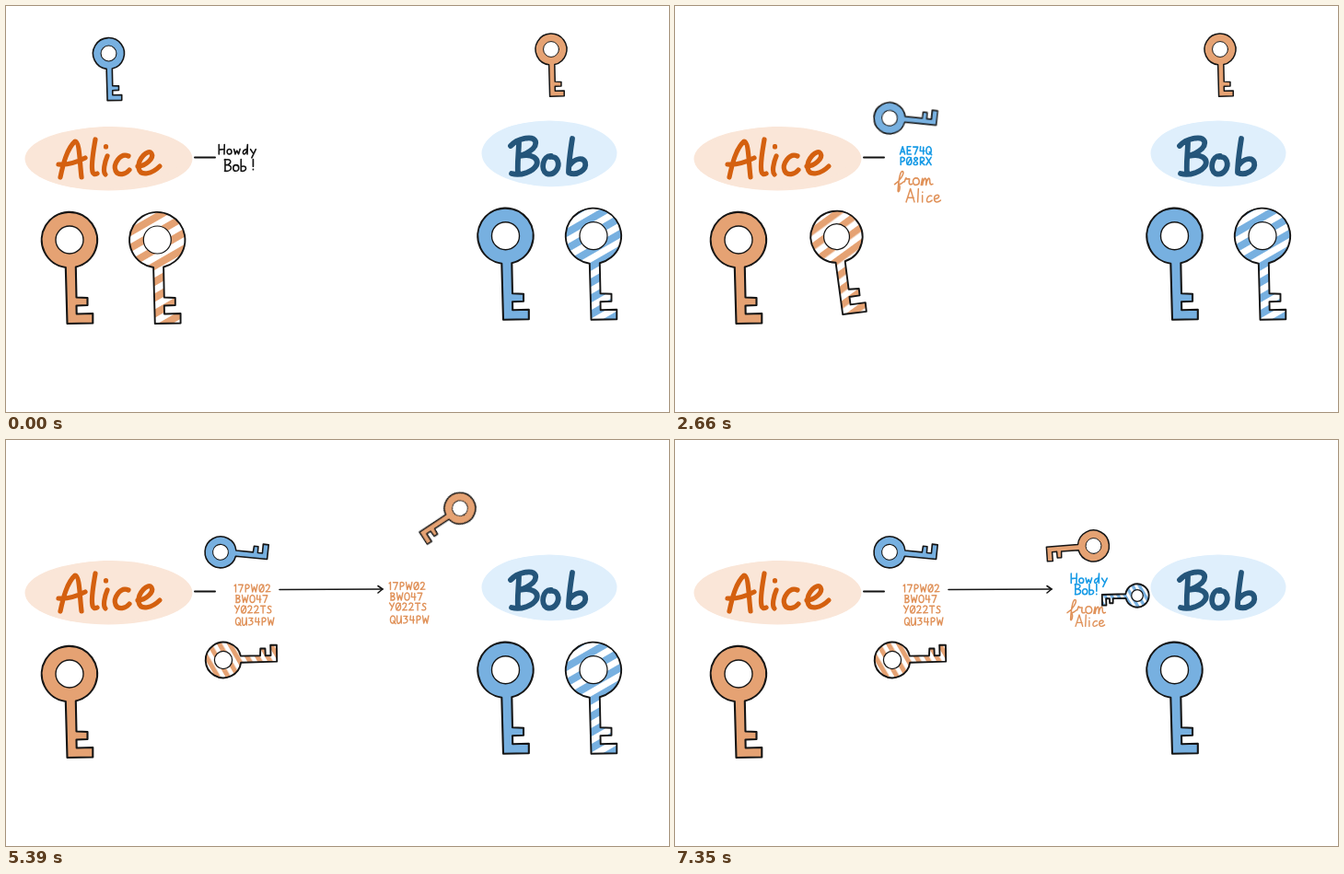
Animation of 720x441 px, one loop 8260 ms. Source, as an HTML page:

```html
<!DOCTYPE html>
<html lang="en">
<head>
<meta charset="utf-8">
<title>Two key pairs</title>
<style>
  html, body { margin: 0; width: 100%; height: 100%; overflow: hidden; background: #fff; }
  svg { display: block; width: 100vw; height: 100vh; }
  path { stroke-linecap: round; stroke-linejoin: round; vector-effect: non-scaling-stroke; }
  .ink { fill: none; }
</style>
</head>
<body>
<svg id="stage" viewBox="0 0 720 441" role="img" aria-label="Alice sends Bob a signed and encrypted message">
  <defs>
    <pattern id="orangeStripes" width="40" height="15" patternUnits="userSpaceOnUse" patternTransform="rotate(-30) translate(0 4)">
      <rect width="40" height="15" fill="#fff"/><rect width="40" height="8" fill="#e5a273"/>
    </pattern>
    <pattern id="blueStripes" width="40" height="15" patternUnits="userSpaceOnUse" patternTransform="rotate(-30) translate(0 8.5)">
      <rect width="40" height="15" fill="#fff"/><rect width="40" height="8" fill="#77b0e0"/>
    </pattern>
    <filter id="soft"><feGaussianBlur stdDeviation="0.7"/></filter>
  </defs>
  <g filter="url(#soft)">
    <g fill="#fae6d8">
      <ellipse cx="111.500" cy="166" rx="91" ry="34.5"/>
      <ellipse cx="108" cy="165" rx="84" ry="34" transform="rotate(-2 108 165)"/>
    </g>
    <g fill="#dfeffc">
      <ellipse cx="590" cy="160" rx="73.5" ry="35.5"/>
      <ellipse cx="588" cy="161" rx="70" ry="35" transform="rotate(3 588 161)"/>
    </g>
  </g>
  <g class="ink" stroke="#d4600f" stroke-width="5.200" aria-label="Alice">
    <path d="M59 186C62 172 66 155 75 147C80 147 80 170 82 186M57 172C66 173 76 170 86 165"/>
    <path d="M97 145C95 157 92 172 94 180Q95 184 99 182"/>
    <path d="M110 163C107 170 105 180 108 183M108.500 152.500V153"/>
    <path d="M133 163C124 159 116 172 119 179C122 185 130 183 134 178"/>
    <path d="M143 174C152 174 161 165 158 160C154 155 143 166 144 176C146 186 159 182 167 174"/>
  </g>
  <g class="ink" stroke="#24557a" stroke-width="5.800" aria-label="Bob">
    <path d="M557 147C557 158 555 170 556 182M548 152C555 144 572 140 575 147C577 155 566 160 558 163C572 160 579 166 576 173C572 180 559 185 549 182"/>
    <path d="M592 163C583 162 580 178 587 182C595 185 602 176 599 168Q597 163 591 164"/>
    <path d="M615 144C613 157 611 170 611 181C620 185 631 178 629 170C627 164 618 165 612 173"/>
  </g>
  <path class="ink" stroke="#111" stroke-width="2" d="M205 164.500L227 164.500"/>
</svg>
<script>
const LOOP = 8260, STEP = 70;
const ORANGE = '#e5a273', BLUE = '#77b0e0', CODE = '#e0925a', SKY = '#189be6', BLACK = '#151515';
const stage = document.getElementById('stage');

// Single-stroke hand lettering: cap height 8, baseline at 8
const OVAL = 'M2.6 0C-1 0-.8 8 2.5 8C6 8 6 0 2.6 0';
const BOWL = 'M.7 8V.3C6-1.2 6 5 .8 4.5';
const GLYPHS = {
  A: 'M0 8L2.6 0L5 8M.8 5.4H4.6',
  B: 'M.6 0V8M.2 .4C6-1 5 4 .8 3.8C6.5 3.6 5.5 8.6 .3 8',
  E: 'M4.2 0H.6V8H4.6M.6 4H3.8',
  H: 'M.2 0V8M4.8 0L4.6 8M.2 4.3L4.7 3.8',
  P: BOWL,
  Q: OVAL + 'M3.2 5.6L5.6 8.6',
  R: BOWL + 'L5 8',
  S: 'M4.4 1C2-1-.5 2 2.4 3.7C6 5.5 4 9 .2 7.4',
  T: 'M0 .2H5.2M2.6 .2V8',
  U: 'M.2 0C-.2 9 1 8.6 2.6 8C4.5 7 4.6 3 4.6 0L4.9 8',
  W: 'M0 0L1.2 8L3 2.5L4.8 8L6.4 0',
  X: 'M0 0L5 8M5 0L0 8',
  Y: 'M0 0L2.6 3.8M5 0L1.5 8',
  0: OVAL,
  'Ø': OVAL + 'M4.8 .5L.6 7.6',
  1: 'M.6 1.2L2 0V8',
  2: 'M.3 1.4C1-.6 4.6-.4 4.2 2.2C3.8 4.5 2 6.5 .2 7.8L5 7.6',
  3: 'M.4 .4H4.4L2.2 3.2C6 3.4 5 8.6 .2 7.7',
  4: 'M.8 0L.4 4.6H5M3.8 .4V8',
  7: 'M0 .3H4.8L1.8 8',
  8: 'M4.4 1C2-1-.6 1.8 2.5 3.8C6 6 4.4 8 2.6 8C-.4 8-.2 5.6 2.4 3.9Q5 2.2 4.4 1',
  b: 'M.4 0V8C5 8.6 4.6 3.4 .4 5',
  c: 'M3.4 4.4C1 3-.6 8 1.4 8Q2.6 8 3.6 7',
  d: 'M4 4.4C1 3-.6 8 1.6 8C3 8 4 5 4.4 0L4.2 8',
  e: 'M.4 6.2C3.6 6 3.6 3.8 2 3.8C-.4 4-.4 8 1.6 8Q2.8 8 4 7',
  f: 'M0 7.6C3 6 6 1 5-.2C3.6-1 2.4 4 2 11.6C2.4 13.4 4 9 2.4 7.6Q4 7.6 5.6 6',
  i: 'M.6 4V8M.7 2V2.2',
  l: 'M1 0L.6 8',
  m: 'M0 8L.8 4V8C1.4 4 2.8 3 3 5V8C3.6 4 5 3 5.2 5Q5 8.6 7 7.4',
  o: 'M2 3.8C-.6 3.8-.4 8 1.8 8C4.6 8 4.4 3.8 2 3.8',
  r: 'M0 6Q1 2.6 1.2 4.4L3 4.4C2.6 6 2.4 8.6 4.6 7.4',
  w: 'M0 3.8L1 8L2.4 5L3.8 8L5 3.8',
  y: 'M0 4L2 7M4.4 4L1 11',
  '!': 'M1 0V5.5M1 7.7V8',
  '.': 'M.4 8V8.1'
};
const ADVANCE = { W: 7.5, 1: 4, i: 2.4, l: 2.4, '!': 3, c: 4.4, e: 5, o: 5, b: 5, y: 5, m: 7.5, r: 5 };

function add(parent, tag, attrs) {
  const el = document.createElementNS('http://www.w3.org/2000/svg', tag);
  for (const name in attrs) el.setAttribute(name, attrs[name]);
  parent.appendChild(el);
  return el;
}

function place(el, x, y, scale, turn = 0) {
  el.setAttribute('transform', `translate(${x} ${y}) rotate(${turn}) scale(${scale})`);
}

function write(parent, text, x, y, scale, color, width = 1.4, gap = 0) {
  const g = add(parent, 'g', { class: 'ink', stroke: color, 'stroke-width': width, 'aria-label': text });
  let pen = 0;
  for (const ch of text) {
    add(g, 'path', { d: GLYPHS[ch], transform: `translate(${pen} 0)` });
    pen += (ADVANCE[ch] || 6) + gap;
  }
  place(g, x, y, scale);
  return g;
}

const group = () => add(stage, 'g', {});

const HOLE = 'M15 0A15 15 0 1 0-15 0A15 15 0 1 0 15 0Z';
const BODY = 'M-4.2 30A30.2 30.2 0 1 1 6.8 29.5L7.5 62.5L19.5 63V71L7.5 71.5L7.7 80.5L25.3 80V90.5L-2.5 91Z';

function makeKey(fill, width, x, y, scale) {
  const g = group();
  add(g, 'path', { d: BODY + HOLE, fill, 'fill-rule': 'evenodd' });
  add(g, 'path', { d: BODY, class: 'ink', stroke: BLACK, 'stroke-width': width });
  add(g, 'path', { d: HOLE, class: 'ink', stroke: BLACK, 'stroke-width': width * 0.65 });
  place(g, x, y, scale);
  return g;
}

function ciphertext(x, tops) {
  const g = group();
  const lines = ['17PWØ2', 'BW047', 'YØ22TS', 'QU34PW'];
  lines.forEach((line, i) => write(g, line, x + [0, 2, 1, 2][i], tops[i], 1, CODE, 1.4, 1));
  return g;
}

function sealedText(x, y) {
  const g = group();
  write(g, 'AE74Q', x, y, 1.03, SKY, 1.6, 0.9);
  write(g, 'PØ8RX', x, y + 11.5, 1.03, SKY, 1.6, 0.9);
  return g;
}

makeKey(ORANGE, 2.1, 69, 254, 1);
makeKey(BLUE, 2.1, 542.5, 249.7, 1);

const howdy = write(stage, 'Howdy', 231, 150.5, 1.3, BLACK, 1.6, 0.9);
const bob = write(stage, 'Bob', 237, 166.5, 1.6, BLACK, 1.6);
const bang = write(stage, '!', 267, 166.5, 1.4, BLACK, 1.7);

const leftCode = sealedText(244.5, 152.8);
const signature = group();
write(signature, 'from', 238.5, 180, 1.8, CODE, 1.6);
write(signature, 'Alice', 251, 198.5, 1.8, CODE, 1.5, 0.4);
const strokes = [...signature.querySelectorAll('path')];
strokes.forEach(p => p.setAttribute('pathLength', 1));

const leftCipher = ciphertext(247.5, [157, 168.5, 180, 193]);
const rightCipher = ciphertext(415.5, [154.5, 166, 177, 191]);

const rightCode = sealedText(430, 142);
const rightSign = group();
write(rightSign, 'from', 426, 174, 1.8, CODE, 1.5);
write(rightSign, 'Alice', 435, 190, 1.55, CODE, 1.4, 0.3);
const speck = write(rightSign, '.', 474.5, 186, 1.4, CODE, 1.5);
const greeting = group();
write(greeting, 'Howdy', 430, 145, 1.3, SKY, 1.6, 0.7);
write(greeting, 'Bob!', 434, 156.5, 1.4, SKY, 1.6);

const shaft = add(stage, 'path', { class: 'ink', stroke: BLACK, 'stroke-width': 1.6 });
const tip = add(stage, 'path', { class: 'ink', stroke: BLACK, 'stroke-width': 1.6, d: 'M-5-3.500L0 0L-5 4' });

const blueKey = makeKey(BLUE, 1.6, 0, 0, 1);
const stripedOrange = makeKey('url(#orangeStripes)', 1.9, 0, 0, 1);
const orangeKey = makeKey(ORANGE, 1.5, 0, 0, 1);
const stripedBlue = makeKey('url(#blueStripes)', 1.9, 0, 0, 1);

const part = (t, from, to) => Math.min(1, Math.max(0, (t - from) / (to - from)));
const mix = (a, b, p) => a + (b - a) * p;
const smooth = p => p * p * (3 - 2 * p);
const bend = (a, b, c, p) => a + (b - a) * (2 * p * (1 - p) * c + p * p);
const fade = (el, value) => { el.style.opacity = value; };

function draw(t) {
  // Sender encrypts
  let p = smooth(part(t, 0, 700));
  place(blueKey, mix(111.5, 233, p), mix(51.5, 121.8, p), 0.562, -83 * p);

  p = part(t, 490, 840);
  const tint = `rgb(${mix(21, 42, p)},${mix(21, 122, p)},${mix(21, 181, p)})`;
  place(howdy, mix(231, 234, p), mix(150.5, 154.5, p), mix(1.3, 1.2, p));
  place(bob, mix(237, 240, p), mix(166.5, 163.5, p), mix(1.6, 1.25, p));
  for (const el of [howdy, bob, bang]) el.setAttribute('stroke', tint);
  const swap = part(t, 840, 1120);
  fade(howdy, 1 - swap);
  fade(bob, 1 - swap);
  fade(bang, 1 - p);

  // Sender signs
  strokes.forEach((el, i) => {
    const q = part(t, 1190 + i * 120, 1310 + i * 120);
    el.style.strokeDasharray = q < 1 ? `${q} 2` : 'none';
    el.style.visibility = q > 0 ? 'visible' : 'hidden';
  });
  p = smooth(part(t, 2520, 3080));
  place(stripedOrange, mix(164.3, 236, p), bend(254, 239, 0.75, p), mix(1, 0.64, Math.pow(p, 0.88)), -90 * Math.pow(p, 1.45));
  const seal = part(t, 3080, 3570);
  fade(leftCode, swap * (1 - seal));
  fade(signature, 1 - seal);
  fade(leftCipher, seal);

  // Message travels
  p = part(t, 3640, 4480);
  const end = mix(297, 409, p);
  shaft.setAttribute('d', `M297 162.500L${end} 162`);
  place(tip, end, 162, 1);
  shaft.style.visibility = tip.style.visibility = p > 0 ? 'visible' : 'hidden';

  // Receiver verifies and decrypts
  p = part(t, 4830, 5670);
  place(orangeKey, bend(592, 454.5, 0.62, p), bend(47, 115, -0.1, p), 0.562, 87 * p);
  const open = part(t, 5670, 6090);
  fade(rightCipher, part(t, 4480, 4830) * (1 - open));
  fade(rightSign, open);
  fade(speck, t <= 6300 ? 1 : 0);

  p = part(t, 5950, 6790);
  place(stripedBlue, bend(638, 502, 0.1, p), mix(249.7, 169, p), mix(1, 0.42, Math.pow(p, 1.4)), 90 * Math.pow(p, 0.95));
  const reveal = part(t, 7000, 7350);
  fade(rightCode, open * (1 - reveal));
  fade(greeting, reveal);
}

const start = performance.now();
function tick() {
  const t = (performance.now() - start) % LOOP;
  draw(Math.floor(t / STEP) * STEP);
  requestAnimationFrame(tick);
}
tick();
</script>
</body>
</html>
```
